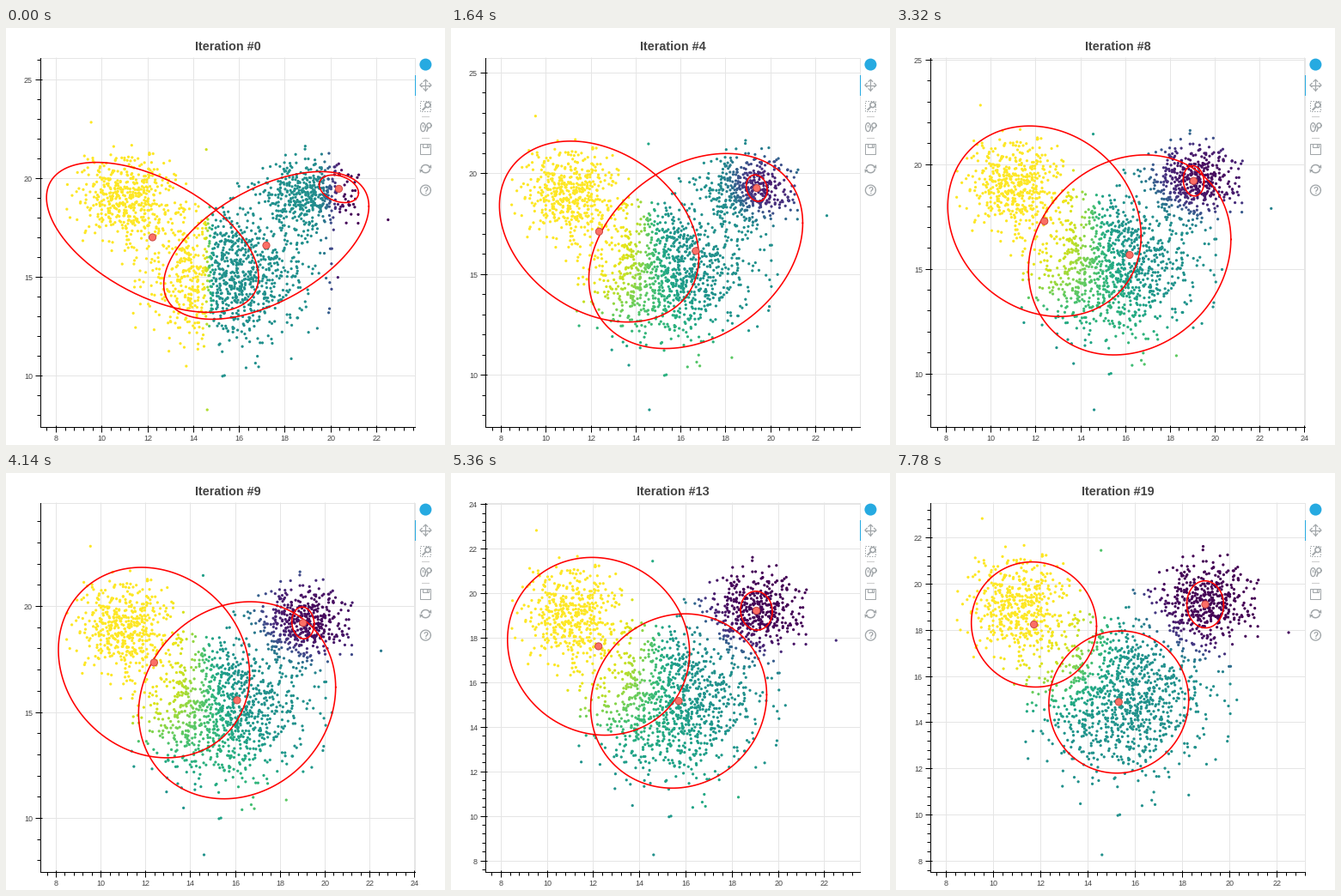
A matplotlib script for the animation above (8 s loop, 511 px wide and 486 px high).

```python
import numpy as np
import matplotlib.pyplot as plt
from matplotlib.animation import FuncAnimation
from matplotlib.collections import LineCollection
from matplotlib.patches import Circle, Rectangle

W, H = 511, 486
LOOP, STEP = 8000, 40
LEFT, RIGHT, TOP, BOTTOM = 40, 476, 33, 464
N_ITER = 20
TEXT, GRID, ICON = "#444444", "#e5e5e5", "#a1a6a9"
FONT = "Liberation Sans"

# Key poses of the components (centre x, y, half width, half height);
# a cubic through them gives every iteration.
KEYS = [0, 6, 11, 19]
POSES = [
    [(12.21, 16.98, 4.63, 3.80), (12.39, 17.16, 4.38, 4.59),
     (12.31, 17.45, 4.14, 4.29), (11.72, 18.22, 2.65, 2.71)],
    [(17.18, 16.57, 4.48, 3.74), (16.42, 15.88, 4.69, 4.92),
     (15.87, 15.33, 4.12, 4.31), (15.31, 14.86, 2.96, 3.08)],
    [(20.35, 19.44, .86, .70), (19.15, 19.20, .43, .68),
     (19.02, 19.20, .59, .81), (18.97, 19.09, .78, 1.02)],
]
PATHS = [np.polyfit(KEYS, np.array(poses), 3) for poses in POSES]
TILTS = (-.53, .53, -.3)

EXTREMES = [(14.6, 8.24), (9.53, 22.81), (22.5, 17.87), (14.56, 21.43)]


def pose(component, iteration):
    return np.polyval(PATHS[component], iteration)


def tilt(component, iteration):
    return TILTS[component] * np.exp(-iteration / 6.5)


def start_time(iteration):
    """The pace changes a little along the run."""
    return np.interp(iteration, [0, 2, 6, 11, 19], [0, 840, 2420, 4580, 7780])


def make_points():
    rng = np.random.default_rng(5)

    def cluster(n, centre, spread, reach):
        z = rng.normal(size=(2 * n, 2))
        z = z[np.hypot(*z.T) < reach][:n]
        return np.array(centre) + z * spread

    return np.vstack([cluster(480, (11.05, 19.0), (1.08, 1.08), 2.7),
                      cluster(1030, (15.4, 15.05), (1.72, 1.7), 3.1),
                      cluster(450, (19.0, 19.15), (.97, .89), 2.8),
                      EXTREMES])


def logistic(z):
    return 1 / (1 + np.exp(-np.clip(z, -60, 60)))


def soft_assignments(points):
    """Memberships per iteration, starting from a split along x."""
    x = points[:, 0]
    first = logistic((14.68 - x) / .07)
    last = logistic((x - 19.98) / .2)
    member = np.stack([first, (1 - first) * (1 - last), (1 - first) * last])
    history = []
    for i in range(N_ITER):
        history.append(member)
        density = []
        for k, w in enumerate(member):
            d = points - pose(k, i)[:2]
            cov = (w * d.T) @ d / w.sum()
            dist = np.einsum("ni,ij,nj->n", d, np.linalg.inv(cov), d)
            density.append(w.sum() * np.exp(-dist / 2) / np.sqrt(np.linalg.det(cov)))
        density = np.array(density) + 1e-300
        member = density / density.sum(axis=0)
    return history


def view(iteration):
    """Pixel mappings and spans for x and y; the lowest values keep their place."""
    sx = np.interp(iteration, [0, 2, 9, 16], [26.65, 26.17, 26.08, 27.5])
    sy = np.interp(iteration, [0, 2, 7, 16], [23, 23.13, 24.05, 26.9])
    return (lambda x: 59.8 + (x - 8.07) * sx, lambda y: 444.4 - (y - 8.24) * sy,
            (RIGHT - LEFT) / sx, (BOTTOM - TOP) / sy)


def ticks(to_px, span, low_px, high_px):
    """Yield (pixel, value, is_major) along one axis."""
    step = min((2, 5), key=lambda s: abs(6 - span / s))
    for n in range(200):
        value = n * step / 5
        px = to_px(value)
        if low_px <= px <= high_px:
            yield round(px), value, n % 5 == 0


fig = plt.figure(figsize=((W + 1e-4) / 72, (H + 1e-4) / 72), dpi=72, facecolor="white")
ax = fig.add_axes([0, 0, 1, 1])
# Whole numbers lie just off pixel centres so that lines snap to their own pixel.
ax.set_xlim(-.4, W - .4)
ax.set_ylim(H - .6, -.6)
ax.axis("off")


def stroke(xs, ys, color=ICON, lw=1.2, **kw):
    ax.plot(xs, ys, color=color, lw=lw, **kw)


def arc(cx, cy, rx, ry, start=0, end=360, **kw):
    t = np.radians(np.linspace(start, end, 40))
    stroke(cx + rx * np.cos(t), cy + ry * np.sin(t), **kw)


def box(x, y, w, h, **kw):
    ax.add_patch(Rectangle((x, y), w, h, fill=False, ec=ICON, **kw))


def label(x, y, text, size=9, **kw):
    return ax.text(x, y, text, fontsize=size, family=FONT,
                   **{"color": TEXT, "va": "baseline", "ha": "center", **kw})


def draw_toolbar():
    cx = 488
    stroke([RIGHT, RIGHT], [54, 77], color="#26aae1", lw=1, zorder=8)
    ax.add_patch(Circle((cx, 42), 7, color="#26aae1", lw=0))
    # pan
    stroke([cx - 6, cx + 6], [66, 66])
    stroke([cx, cx], [60, 72])
    for dx, dy in ((1, 0), (-1, 0), (0, 1), (0, -1)):
        tip = np.array([cx + 6.5 * dx, 66 + 6.5 * dy])
        back, side = np.array([dx, dy]) * 2.3, np.array([dy, dx]) * 2.3
        stroke(*np.array([tip - back + side, tip, tip - back - side]).T)
    # box zoom
    box(482, 84, 12, 12, lw=1, ls=(0, (1.5, 1.5)))
    arc(490.5, 89, 3, 3, lw=1.6)
    stroke([488, 485], [91.5, 94.5], lw=2)
    for y in (102, 127):
        stroke([484, 492], [y, y], color="#cccccc", lw=1)
    # wheel zoom
    arc(485, 115, 2.8, 5, lw=1.3)
    stroke([485, 485], [112, 114.5], lw=1)
    arc(492, 113, 2.6, 2.8, lw=1.4)
    stroke([491, 489.5], [116, 119.5], lw=1.6)
    # save
    box(482, 134, 12, 12, lw=1)
    box(485, 134, 7, 4, lw=1)
    stroke([490, 490], [135, 137])
    # reset
    for side, start in ((1, 190), (-1, 10)):
        arc(cx, 163.5, 5, 4.6, start, start + 145, lw=1.5)
        ax.fill(cx + side * np.array([3, 7, 6.5]),
                163.5 - side * np.array([1, .5, 5]), color=ICON, lw=0)
    # help
    arc(cx, 188.5, 6, 6, lw=1.3)
    label(cx, 192, "?", size=10, color=ICON, weight="bold")


def draw_frame():
    stroke([LEFT, RIGHT, RIGHT], [TOP + 1, TOP + 1, BOTTOM], color=GRID, lw=1, zorder=1)
    stroke([LEFT, LEFT], [TOP + 1, BOTTOM], color="black", lw=1, zorder=6)
    stroke([LEFT, RIGHT], [BOTTOM, BOTTOM], color="black", lw=1, zorder=6)


def draw_iteration(i):
    """Create every artist that belongs to one iteration."""
    to_x, to_y, span_x, span_y = view(i)
    group = [label(257.5, 25.8, f"Iteration #{i}", size=14.4, weight="bold")]
    grid, marks = [], []
    for px, value, major in ticks(to_x, span_x, LEFT, RIGHT):
        marks.append([(px, BOTTOM - 2 * major), (px, BOTTOM + (6 if major else 4))])
        if major:
            grid.append([(px, TOP), (px, BOTTOM)])
            group.append(label(px, 480, f"{value:.0f}"))
    for px, value, major in ticks(to_y, span_y, TOP, BOTTOM):
        marks.append([(LEFT + 2 * major, px), (LEFT - (6 if major else 4), px)])
        if major:
            grid.append([(LEFT, px), (RIGHT, px)])
            group.append(label(30.5, px + 4, f"{value:.0f}", ha="right"))
    for lines, color, z in ((grid, GRID, 1), (marks, "black", 6)):
        group.append(ax.add_collection(
            LineCollection(lines, colors=color, linewidths=1, zorder=z), autolim=False))

    first, middle, _ = memberships[i]
    group.append(ax.scatter(to_x(points[:, 0]), to_y(points[:, 1]), s=10.5, lw=0,
                            c=plt.cm.viridis(first + middle / 2), zorder=3))
    t = np.linspace(0, 2 * np.pi, 160)
    for k in range(3):
        cx, cy, half_w, half_h = pose(k, i)
        group += ax.plot(to_x(cx + half_w * np.cos(t)),
                         to_y(cy + half_h * np.cos(t - np.arccos(tilt(k, i)))),
                         color="red", lw=1.6, zorder=4)
        group.append(ax.add_patch(Circle((to_x(cx), to_y(cy)), 4.1, fc="#fb6f66",
                                         ec="#c8423e", lw=.9, zorder=5)))
    return group


points = make_points()
memberships = soft_assignments(points)
draw_toolbar()
draw_frame()
groups = [draw_iteration(i) for i in range(N_ITER)]
starts = start_time(np.arange(N_ITER))


def update(frame):
    time = frame * STEP + STEP / 2
    current = np.searchsorted(starts, time, side="right") - 1
    for i, group in enumerate(groups):
        for artist in group:
            artist.set_visible(i == current)


update(0)
anim = FuncAnimation(fig, update, frames=LOOP // STEP, interval=STEP,
                     repeat=True, repeat_delay=0, cache_frame_data=False)
plt.show()
```
